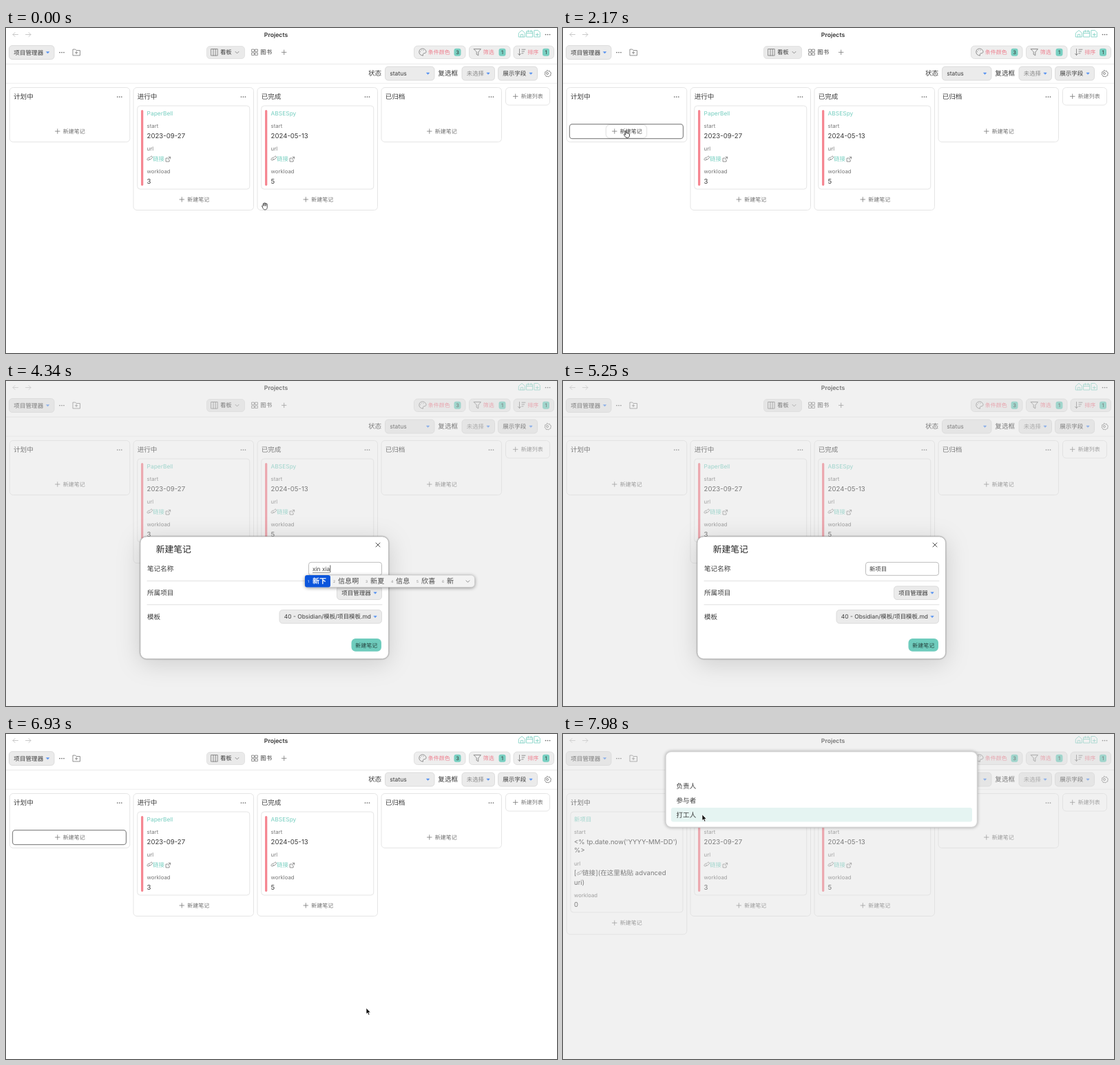
An HTML page that plays this animation: 800x472 px, repeating every 8000 ms.

```html
<!DOCTYPE html>
<html lang="zh-CN">
<head>
<meta charset="utf-8">
<title>Projects</title>
<style>
html, body { margin: 0; width: 100%; height: 100%; overflow: hidden; background: #fff; }
svg { display: block; width: 100vw; height: 100vh; }
text { font-family: Inter, "Noto Sans CJK SC", "Noto Sans CJK", sans-serif; text-rendering: geometricPrecision; white-space: pre; }
#modal > .panel, #prompt > .panel {
  filter: drop-shadow(0 .5px 1.2px rgba(0,0,0,.4)) drop-shadow(0 6px 17px rgba(0,0,0,.15));
}
#prompt > .panel { filter: drop-shadow(0 0 2px rgba(0,0,0,.28)); }
#ime > .panel { filter: drop-shadow(0 1px 2.5px rgba(0,0,0,.4)); }
#hover > .panel { filter: drop-shadow(0 .6px .8px rgba(0,0,0,.3)); }
</style>
</head>
<body>
<svg id="stage" viewBox="0 0 800 472"></svg>
<script>
const INK = '#3c3c3c', MUTED = '#777', TEAL = '#78cfc1', PINK = '#ee7f8e', BLUE = '#4a8af0', EDGE = '#e2e2e2';
const LOOP = 8000;

// drawing helpers
const text = (x, y, s, size = 9.6, fill = INK, extra = '') =>
  `<text x="${x}" y="${y}" font-size="${size}" fill="${fill}" ${extra}>${s.replace(/</g, '&lt;')}</text>`;
const rect = (x, y, w, h, r, fill = 'none', stroke = 'none', extra = '') =>
  `<rect x="${x}" y="${y}" width="${w}" height="${h}" rx="${r}" fill="${fill}" stroke="${stroke}" ${extra}/>`;
const path = (d, stroke = MUTED, w = .8, fill = 'none') =>
  `<path d="${d}" fill="${fill}" stroke="${stroke}" stroke-width="${w}" stroke-linecap="round" stroke-linejoin="round"/>`;
const at = (x, y, s) => `<g transform="translate(${x} ${y})">${s}</g>`;
const group = (id, s) => `<g id="${id}">${s}</g>`;
const line = (x, y, w, c = EDGE) => path(`M${x} ${y}h${w}`, c, .8);
const plus = (x, y, r = 3.3) => path(`M${x - r} ${y}h${2 * r}M${x} ${y - r}v${2 * r}`);
const dots = (x, y) => [-3, 0, 3].map(d => `<circle cx="${x + d}" cy="${y}" r=".85" fill="#666"/>`).join('');
const caretDown = (x, y) => path(`M${x - 2} ${y - 1}h4l-2 2.3z`, BLUE, .5, BLUE);
const chevron = (x, y) => path(`M${x - 2.5} ${y - 1.2}l2.5 2.5 2.5 -2.5`);
const box = (x, y, w, h) => rect(x, y, w, h, 4.5, '#ebebeb', '#d6d6d6', 'stroke-width=".8"');
const select = (x, y, w, h, s, size = 8.5, fill = INK) =>
  box(x, y, w, h) + text(x + 6.8, y + h / 2 + 3.1, s, size, fill) + caretDown(x + w - 9.3, y + h / 2);
const newNote = (cx, y) => plus(cx - 17.5, y) + text(cx - 9.5, y + 3, '新建笔记', 8, '#707070');

function chip(x, w, label, count, icon) {
  return rect(x, 26, w, 18.5, 5, '#eee', '#dadada', 'stroke-width=".8"') + at(x + 12, 35, icon) +
    text(x + 20.3, 38, label, 8, PINK) + rect(x + w - 16.5, 29.7, 10, 11, 3, TEAL) +
    text(x + w - 11.5, 38, count, 7.5, '#333', 'text-anchor="middle"');
}

const linkIcon = (x, y) => at(x, y,
  path('M2.6 1.4L1 3C-.8 4.6 1.6 6.6 3.2 5L4.2 4M3 2.6L5.4 .2C7-1.2 8.8 .8 7.4 2.3L5.4 4.2C4.5 5 3.4 4.6 3 3.8', '#777', .8));
const outIcon = (x, y) => at(x, y, path('M3 1.5H0V6.5H5V3.8M4-.2H6.6V2.4M6.6-.2L3 3.4', '#777', .8));

function column(x, title, bottom) {
  return rect(x, 86.5, 174.5, bottom - 86.5, 5, 'none', EDGE, 'stroke-width=".9"') +
    text(x + 5.7, 103.3, title) + dots(x + 159.5, 100);
}
function field(x, y, label, value) {
  return text(x, y, label, 7.8, MUTED) + text(x, y + 14.3, value);
}
function card(x, title, start, load) {
  const tx = x + 13.8;
  return rect(x, 113, 163, 121, 4, 'none', EDGE, 'stroke-width=".9"') +
    rect(x + 5.3, 119, 3.2, 110, 1.6, '#f5848f') +
    text(tx, 127.2, title, 8.4, TEAL) + field(tx, 145.2, 'start', start) +
    text(tx, 178, 'url', 7.8, MUTED) + linkIcon(tx, 186.5) + text(tx + 8.3, 193, '链接', 8.5, TEAL) + outIcon(tx + 27.5, 187.5) +
    field(tx, 211.2, 'workload', load) + newNote(x + 82, 249);
}

const topBar =
  path('M17.5 9.5H10M13 6.5l-3 3 3 3M28.5 9.5H36M33 6.5l3 3-3 3', '#bdbdbd') +
  text(392, 12.6, 'Projects', 8.7, '#333', 'font-weight="600" text-anchor="middle"') +
  path('M744.6 7.2L749 3.4l4.4 3.8V13h-8.8zM747.3 13V9.3h3.4V13', TEAL) +
  path('M756 4.8h8.6V13H756zM756 7.5h8.6M758.3 3.2v2.4M762.3 3.2v2.4', TEAL) +
  path('M767.3 3.4h5l3 3V13h-8zM769.3 9.6h4M771.3 7.6v4', TEAL) + dots(786.5, 9.5);

const toolBar =
  select(4.5, 25.5, 65.5, 20, '项目管理器', 8.6) + dots(81, 35.5) +
  path('M97 39.5V31h3.8l1.3 1.5h5.4v7zM102.2 34v3.6M100.4 35.8h3.6') +
  rect(291.5, 26.5, 55, 18, 4.5, '#eaeaea', '#dedede', 'stroke-width=".8"') +
  path('M298 30.5h9.2v9.5H298zM301 30.5V40M304.2 30.5V40') + text(311, 38.2, '看板', 8.4) + chevron(335.5, 35.5) +
  path('M357 31h3.4v3.4H357zM362 31h3.4v3.4H362zM357 36h3.4v3.4H357zM362 36h3.4v3.4H362z') +
  text(369.3, 38.2, '图书', 8.4) + plus(403.7, 35.3) +
  chip(592.5, 74.5, '条件颜色', '3', path('M1 5C-7 5-6-5 0-5S7 1.6 3.4 1.6 1.5 5 1 5M-3-.5h.1M-1.3-2.8h.1M1.6-2.6h.1')) +
  chip(672.5, 59.5, '筛选', '1', path('M-5-4.5H5L1.3 0V4.8L-1.3 3.4V0z')) +
  chip(737, 58.5, '排序', '1', path('M-3.5-4.5v9M-5.5 2.3l2 2.2 2-2.2M0-3.8h5M0-1h3.6M0 1.8h2')) +
  line(0, 52.3, 800) +
  text(526, 69.2, '状态') + select(550.5, 56, 71.5, 20, 'status') +
  text(627.3, 69.2, '复选框') + select(662, 56, 47.5, 20, '未选择', 8.4, '#888') +
  select(714.5, 56, 57, 20, '展示字段') +
  path('M786 61.4l1.4 1.2 1.9-.3.6 1.8 1.6 1-.7 1.8.2 1.9-1.8.6-1.2 1.5-1.8-.7-1.9.3-.7-1.8-1.5-1.1.7-1.8-.3-1.9 1.9-.5z') +
  '<circle cx="786" cy="66" r="1.5" fill="none" stroke="#777" stroke-width=".8"/>' +
  line(0, 80.3, 800, '#ebebeb');

const board =
  group('planEmpty', column(5.3, '计划中', 165.5) + newNote(92.3, 150)) +
  group('planFull', column(5.3, '计划中', 291) + rect(11, 113, 163, 146, 4, 'none', EDGE, 'stroke-width=".9"') +
    text(16, 127.2, '新项目', 8.5, TEAL) + field(16, 145.2, 'start', "<% tp.date.now('YYYY-MM-DD')") + text(16, 172.3, '%>') +
    text(16, 190.8, 'url', 7.8, MUTED) + text(16, 205.3, '[') + linkIcon(19.8, 199) +
    text(28, 205.3, '链接](在这里粘贴 advanced') + text(16, 218.5, 'uri)') +
    field(16, 236.6, 'workload', '0') + newNote(92.3, 274.3)) +
  group('ring', rect(9.5, 139.7, 165, 21, 4, 'none', '#8c8c8c', 'stroke-width="1.3"')) +
  group('hover', rect(63, 141, 58, 18.5, 5, '#fff', 'none', 'class="panel"') + plus(74.8, 150) + text(82.8, 153, '新建笔记', 8, '#444')) +
  column(185, '进行中', 264.5) + card(190.8, 'PaperBell', '2023-09-27', '3') +
  column(365, '已完成', 264.5) + card(370.8, 'ABSESpy', '2024-05-13', '5') +
  column(545, '已归档', 165.5) + newNote(632.3, 150) +
  rect(725.5, 86.5, 64, 25.5, 5, 'none', EDGE, 'stroke-width=".9"') + plus(739.7, 99.3) + text(747.8, 102.2, '新建列表', 8, MUTED);

const modal =
  rect(195, 226, 360.5, 177.5, 9, '#fff', '#b5b5b5', 'class="panel" stroke-width=".7"') +
  text(217.7, 249.3, '新建笔记', 12.8, '#222', 'font-weight="500"') + path('M537 235l6 6M543 235l-6 6', '#555', 1) +
  text(205, 276.2, '笔记名称') + rect(439.5, 263.3, 106, 19, 3.5, '#fff', '#bdbdbd', 'stroke-width="1"') +
  group('selected', rect(444.5, 267.3, 26, 11, 0, '#b4d7fb')) +
  text(445, 276, '', 8.4, INK, 'id="name"') +
  group('compose', '<path id="under" stroke="#444" stroke-width=".6"/>') +
  group('caret', '<path id="bar" stroke="#333" stroke-width=".8"/>') +
  line(205, 290.3, 341, '#d8d8d8') + text(205, 311.2, '所属项目') + select(480.5, 298, 65, 19.5, '项目管理器') +
  line(205, 324.8, 341, '#d8d8d8') + text(205, 345.7, '模板') + select(397, 332.5, 148.5, 19.5, '40 - Obsidian/模板/项目模板.md', 8.45) +
  rect(501.5, 374, 43.5, 18.8, 6, '#6fccbd') + text(507.3, 386.5, '新建笔记', 8, '#25413d');

const prompt =
  rect(149, 25.5, 452.5, 110, 8, '#fff', '#d2d2d2', 'class="panel" stroke-width="1.4"') +
  `<rect id="pick" x="157" width="437" height="20.5" rx="3" fill="#e5f4f2"/>` +
  ['负责人', '参与者', '打工人'].map((s, i) => text(164.5, 78.7 + 21.1 * i, s)).join('');

const shapes = {
  arrow: path('M0 0V8.6L2 6.9 3.4 10.2 5 9.5 3.6 6.4H6.2Z', '#fff', .7, '#111'),
  grab: path('M-3.8 .6C-5.2-.8-4-2-2.8-.8V-3.6C-2.8-4.6-1.4-4.6-1.4-3.6V-4.4C-1.4-5.4 .2-5.4 .2-4.4V-4C.2-4.9 1.7-4.9 1.7-4V-3.2C1.7-4 3.3-4 3.3-3.2V1C3.3 4 2 5-.2 5S-2.8 3-3.8 .6ZM-1.4-3.6V-.8M.2-4V-.8M1.7-3.2V-.8', '#333', .8, '#fff'),
  point: at(.2, 4, path('M-1.6-4.4C-1.6-5.4 0-5.4 0-4.4V-1.2C.4-1.8 1.4-1.7 1.5-.9 2.1-1.4 3-1.1 3-.3 3.6-.6 4.3-.3 4.3 .5V2C4.3 4.5 3 5.4 1 5.4S-1.4 4.4-3.4 1.6C-4.2 .4-3-.4-2.2 .4L-1.6 1Z', '#222', .9, '#fff'))
};

document.getElementById('stage').innerHTML =
  rect(0, 0, 800, 472, 0, '#fff') + topBar + toolBar + board +
  group('cover', rect(0, 0, 800, 472, 0, '#dcdcdc', 'none', 'opacity=".4"')) +
  group('modal', modal) + group('ime', '') + group('prompt', prompt) +
  group('cursor', Object.keys(shapes).map(k => group(k, shapes[k])).join(''));

const el = id => document.getElementById(id);
const show = (id, on) => { el(id).style.display = on ? '' : 'none'; };

// event times in ms
const PRESS = 2100, OPEN = 2310, TYPE = 3850, COMMIT = 4970, MOVE = 6020, CLOSE = 6860, CARD = 7140, ASK = 7350;

// time, typed letters, candidates
const typing = [
  [TYPE, 'x', '想 下 小 新 学 向'],
  [3920, 'xi', '西 系 细 洗 喜 戏'],
  [4010, 'xin', '新 心 信 欣 辛 芯'],
  [4130, 'xin x', '新学 心想 欣喜 信息 新 心'],
  [4200, 'xin xi', '信息 欣喜 新戏 心细 新 心'],
  [4290, 'xin xia', '新下 信息啊 新夏 信息 欣喜 新'],
  [4410, 'xin xian', '新鲜 新县 心弦 心线 新 心'],
  [4500, 'xin xiang', '新乡 心想 信箱 新项 新 心'],
  [4620, 'xin xiang m', '新项目 心想吗 新乡 信箱 新 心'],
  [4710, 'xin xiang mu', '新项目 新香木 新乡 信箱 新 心']
];

// cursor path: time, x, y
const track = [
  [1050, 376, 259], [1190, 345, 264], [1400, 235, 236], [1610, 125, 176], [1820, 92, 150],
  [2540, 92, 150], [2660, 190, 176], [2800, 410, 281], [2900, 570, 363], [3010, 640, 398],
  [6300, 640, 398], [6510, 585, 392], [6720, 523, 388], [6860, 523, 389], [6930, 523, 398],
  [7420, 523, 398], [7560, 485, 362], [7700, 410, 300], [7840, 275, 186], [7940, 202, 117]
];
function cursorAt(t) {
  const i = track.findIndex(k => k[0] > t);
  if (i < 0) return track[track.length - 1].slice(1);
  if (!i) return track[0].slice(1);
  const [a, b] = [track[i - 1], track[i]], f = (t - a[0]) / (b[0] - a[0]);
  return [1, 2].map(j => a[j] + (b[j] - a[j]) * f);
}

function candidates(words) {
  let x = 438, s = '', blue = 0;
  words.split(' ').forEach((w, i) => {
    const c = i ? '#4a4a4a' : '#fff';
    s += text(x, 292.5, String(i + 1), 5, i ? '#888' : '#fff') +
      text(x + 7, 294.3, w, 10.1, c, i ? '' : 'font-weight="700"');
    x += 16.8 + 10.1 * w.length;
    if (!i) blue = x - 438;
  });
  const w = x + 14.5 - 434 + 6;
  return rect(434, 282, w, 17.5, 5, '#f3f3f3', '#c8c8c8', 'class="panel" stroke-width=".6"') +
    rect(434, 282, blue, 17.5, 3, '#0b55dc') + s + chevron(434 + w - 10, 291);
}

let shown = '';
function render(t) {
  const [x, y] = cursorAt(t);
  const open = t >= OPEN && t < CLOSE, ask = t >= ASK;
  const onButton = t < OPEN && x < 121 && y < 162;
  show('planEmpty', t < CARD);
  show('planFull', t >= CARD);
  show('ring', (t >= PRESS && t < OPEN) || (t >= CLOSE && t < CARD));
  show('hover', onButton);
  show('cover', open || ask);
  show('modal', open);
  show('prompt', ask);
  el('pick').setAttribute('y', y < 128 ? 107 : 64.8);

  const step = t < COMMIT ? typing.filter(s => s[0] <= t).pop() : null;
  const name = step ? step[1] : t < COMMIT ? '未命名' : '新项目';
  el('name').textContent = name;
  show('selected', t < TYPE);
  show('compose', !!step);
  show('caret', t >= TYPE && t < 5250);
  show('ime', !!step);
  if (step && shown !== step[1]) {
    el('ime').innerHTML = candidates(step[2]);
    shown = step[1];
  }
  if (open) {
    const end = 445 + el('name').getComputedTextLength();
    el('under').setAttribute('d', `M445 278.3H${end}`);
    el('bar').setAttribute('d', `M${end + .6} 267.5v10.5`);
  }

  const shape = t >= OPEN ? 'arrow' : onButton ? 'point' : 'grab';
  Object.keys(shapes).forEach(k => show(k, k === shape));
  show('cursor', t < TYPE || t >= MOVE);
  el('cursor').setAttribute('transform', `translate(${x} ${y})`);
}

const begin = performance.now();
function tick() {
  render((performance.now() - begin) % LOOP);
  requestAnimationFrame(tick);
}
tick();
</script>
</body>
</html>
```
